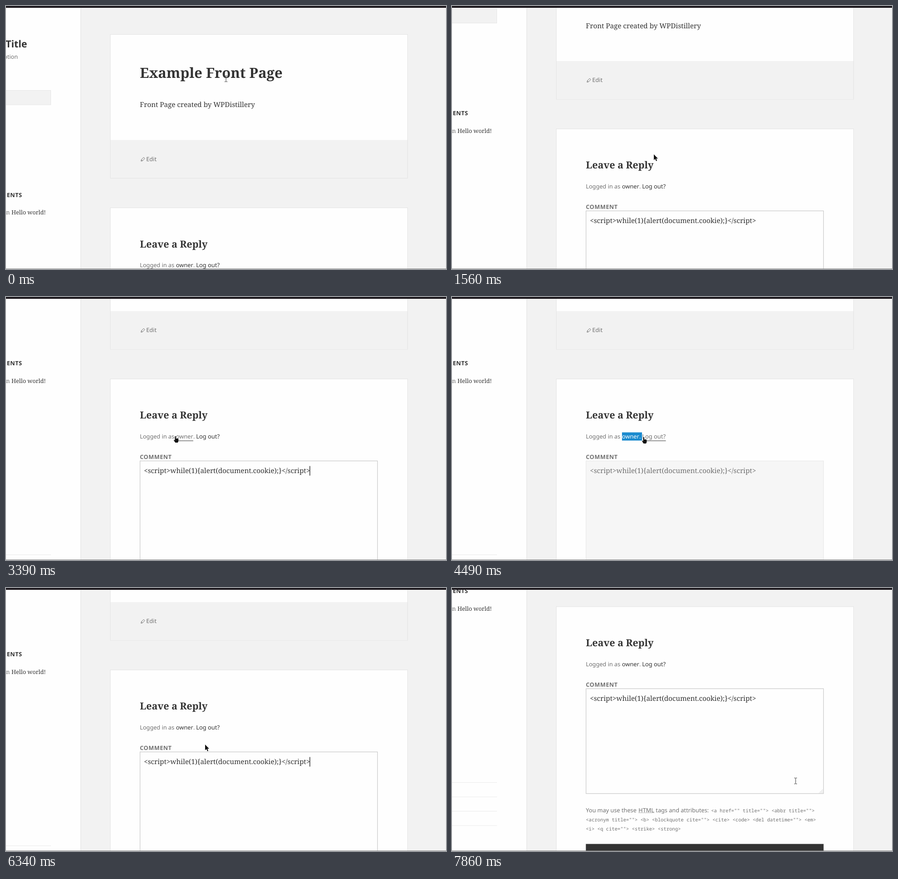
An HTML page for the animation above (8000 ms loop, 968 by 578 pixels).

```html
<!DOCTYPE html>
<html lang="en">
<head>
<meta charset="utf-8">
<title>Comment form</title>
<style>
html, body { margin: 0; width: 100%; height: 100%; overflow: hidden; background: #f2f2f2; }
svg { display: block; width: 968px; height: 578px; }
text { font: 12.7px "Noto Sans", sans-serif; fill: #707070; text-rendering: geometricPrecision; white-space: pre; }
.serif { font-family: "Noto Serif", serif; }
.body { font-size: 15.21px; }
.dark { fill: #333; }
.bold { font-weight: 700; }
.caps { letter-spacing: .04em; }
.end { text-anchor: end; }
.code { font: 10.55px "Noto Sans Mono", monospace; }
.card { fill: #fefefe; stroke: #e3e3e3; }
.rule { stroke: #eaeaea; }
.link.hover { fill: #707070; }
.underline { stroke: #333; }
#box { fill: #f6f6f6; stroke: #e6e6e6; }
#box.focus { fill: #fefefe; stroke: #bdbdbd; }
.cursor { stroke: #fff; stroke-width: 1; paint-order: stroke; fill: #111; }
</style>
</head>
<body>
<svg viewBox="0 0 968 578">
  <defs><clipPath id="selClip"><rect id="selArea" x="374" y="560" height="20"/></clipPath></defs>
  <rect width="968" height="578" fill="#f2f2f2"/>

  <g id="content">
    <rect class="card" x="229.5" y="62.5" width="654" height="316"/>
    <rect x="230" y="294.5" width="653" height="83.5" fill="#f2f2f2"/>
    <text class="serif bold dark" x="294.5" y="158" style="font-size:30.86px">Example Front Page</text>
    <text class="serif body dark" x="294.5" y="222.3">Front Page created by WPDistillery</text>
    <path d="M297 341l.8-3.4 5-5 2.6 2.6-5 5ZM298 337.8l2.4 2.4" fill="none" stroke="#707070"/>
    <text x="308.5" y="340.6">Edit</text>

    <rect class="card" x="229.5" y="443.5" width="654" height="640"/>
    <text class="serif bold dark" x="294.5" y="530.5" style="font-size:21.36px">Leave a Reply</text>
    <text x="294.5" y="574.3">Logged in as </text>
    <text id="user" class="link dark" x="374" y="574.3">owner</text>
    <text x="412" y="574.3">.</text>
    <text id="logout" class="link dark" x="418.2" y="574.3" style="font-size:12.9px">Log out?</text>
    <path id="userLine" class="underline" d="M374 579.5h38"/>
    <path id="logoutLine" class="underline" d="M418 579.5h52.5"/>
    <g clip-path="url(#selClip)">
      <rect x="374" y="561" width="44" height="18" fill="#1b8bcf"/>
      <text x="374" y="574.3" style="fill:#fff">owner<tspan x="412">.</tspan></text>
    </g>

    <text class="bold caps" x="294.5" y="619">COMMENT</text>
    <rect id="box" x="294.9" y="623.7" width="522.4" height="230.6"/>
    <path d="M808 853l8-8M811 853l5-5M814 853l2-2" stroke="#aaa" stroke-dasharray="1 1"/>
    <text id="comment" class="serif body" x="303.5" y="650.5">&lt;script&gt;while(1){alert(document.cookie);}&lt;/script&gt;</text>
    <path id="caret" d="M668.5 635v21" stroke="#222" stroke-width="1.4"/>

    <text x="294.5" y="895">You may use these <tspan x="410.3">HTML</tspan><tspan x="448.3">tags and attributes:</tspan></text>
    <path d="M410.5 896.5h34.5" stroke="#707070" stroke-dasharray="1 1"/>
    <text class="code" x="570" y="895">&lt;a href="" title=""&gt; &lt;abbr title=""&gt;</text>
    <text class="code" x="294.5" y="915">&lt;acronym title=""&gt; &lt;b&gt; &lt;blockquote cite=""&gt; &lt;cite&gt; &lt;code&gt; &lt;del datetime=""&gt; &lt;em&gt;</text>
    <text class="code" x="294.5" y="935">&lt;i&gt; &lt;q cite=""&gt; &lt;strike&gt; &lt;strong&gt;</text>
    <rect x="294.5" y="965" width="523" height="44" fill="#333"/>
  </g>

  <rect width="164" height="578" fill="#fefefe"/>
  <path d="M164.5 0v578" stroke="#e0e0e0"/>
  <g id="sidebar">
    <text class="bold dark end" x="46.5" y="90.5" style="font-size:21.4px">Site Title</text>
    <text class="end" x="26" y="115.5">Site Description</text>
    <rect x="-150" y="185.5" width="248.5" height="31.5" fill="#f2f2f2" stroke="#e6e6e6"/>
    <text class="bold dark caps end" x="35.5" y="419.7">RECENT COMMENTS</text>
    <text class="serif end" x="8.5" y="458">on</text>
    <text class="serif dark" x="12" y="458">Hello world!</text>
    <path class="rule" d="M0 836h99m-99 31.5h99m-99 31.5h99m-99 31.5h99"/>
  </g>

  <rect width="968" height="4" fill="#1e1a1f"/>
  <rect y="577" width="968" height="1" fill="#858585"/>

  <g id="tooltip">
    <rect x="421" y="327" width="136" height="37" rx="3" fill="#222"/>
    <text x="489" y="349" text-anchor="middle" style="font-size:10.3px;fill:#fff">Log out of this account</text>
  </g>
  <g id="mouse">
    <path id="arrow" class="cursor" d="M0 0V12.5L3 10 5 14.8 7 14 5.2 9.2H9Z"/>
    <path id="beam" d="M-3-6.5h2.2l.8.8.8-.8H3M0-5.7V5.7M-3 6.5h2.2l.8-.8.8.8H3" fill="none" stroke="#333"/>
    <path id="hand" class="cursor" d="M-1.5 0H.8V5H5L6.5 6.5V10.5L5 14H-.5L-4 9 -3 8 -1.5 9Z"/>
  </g>
</svg>
<script>
const LOOP = 8000;
const $ = id => document.getElementById(id);
const clamp = (v, low, high) => Math.min(high, Math.max(low, v));
const within = (t, from, to) => t >= from && t < to;

// Eased progress from 0 to 1 between two times
function ease(t, from, to) {
  const p = clamp((t - from) / (to - from), 0, 1);
  return p * p * (3 - 2 * p);
}

const scrollAt = t =>
  179.5 * ease(t, 1350, 1560) + 90 * ease(t, 1810, 2270) +
  136 * ease(t, 6500, 6910) + 3 * ease(t, 7580, 7860);

const glides = [
  { from: 150, to: 1560, x: 444, y: 326 },  // down the page
  { from: 2540, to: 3110, x: 373, y: 306 }, // to the user name
  { from: 3940, to: 4490, x: 422, y: 308 }, // select it
  { from: 5330, to: 5510, x: 375, y: 315 },
  { from: 5800, to: 5940, x: 438, y: 344 }, // to the comment label
  { from: 6500, to: 6910, x: 727, y: 360 },
  { from: 7400, to: 7860, x: 756, y: 424 }
];

const mouseAt = t => glides.reduce((pos, glide) => {
  const p = ease(t, glide.from, glide.to);
  return { x: pos.x + (glide.x - pos.x) * p, y: pos.y + (glide.y - pos.y) * p };
}, { x: 484, y: 160 });

const show = (id, on) => $(id).setAttribute("visibility", on ? "visible" : "hidden");
const move = (id, x, y) => $(id).setAttribute("transform", `translate(${x} ${y})`);

function hover(id, on) {
  $(id).classList.toggle("hover", on);
  show(id + "Line", on);
}

function draw(t) {
  const scroll = scrollAt(t);
  const mouse = mouseAt(t);
  const focused = !within(t, 3940, 6210);
  const overUser = within(t, 3000, 3540);
  const overLogout = within(t, 4490, 5380);
  const overText = t < 700 || within(t, 3540, 4490) || t > 6650;
  const cursor = overUser || overLogout ? "hand" : overText ? "beam" : "arrow";

  // The page settles 6px lower while the sidebar stays put
  move("content", 0, t < 150 ? 0 : 6 - scroll);
  move("sidebar", 0, -scroll);
  move("mouse", mouse.x, mouse.y);
  for (const id of ["arrow", "beam", "hand"]) show(id, id === cursor);

  hover("user", overUser);
  hover("logout", overLogout);
  show("tooltip", within(t, 5110, 5380));
  const selected = t < 4490 ? clamp(mouse.x - 374, 0, 44) : 44;
  $("selArea").setAttribute("width", focused ? 0 : selected);

  $("box").classList.toggle("focus", focused);
  $("comment").classList.toggle("dark", focused);
  show("caret", within(t, 1810, 2690) || within(t, 3110, 3940) || within(t, 6210, 7030));
}

const start = performance.now();
function frame() {
  draw((performance.now() - start) % LOOP);
  requestAnimationFrame(frame);
}
frame();
</script>
</body>
</html>
```
